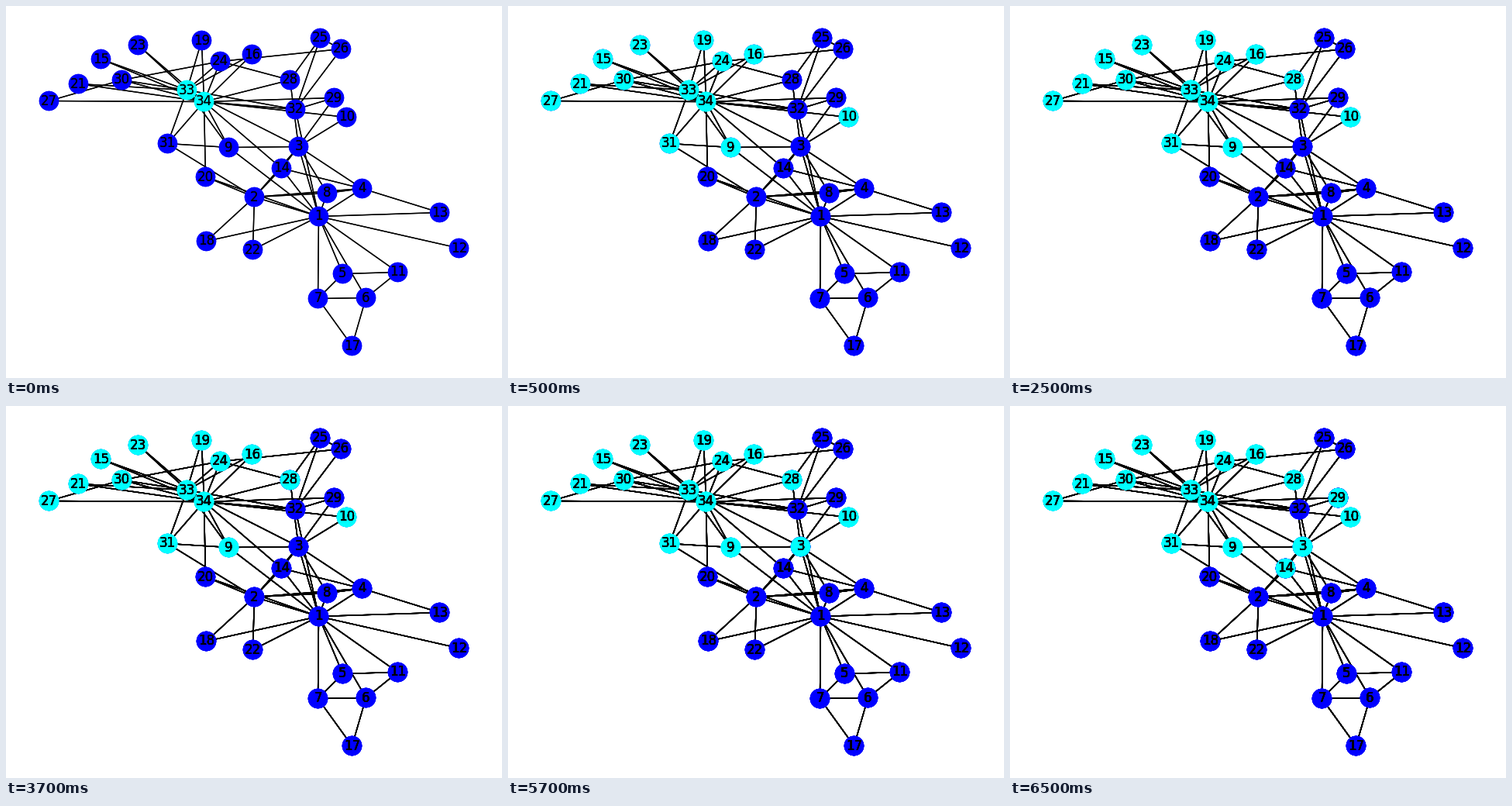
Write a matplotlib script that moves like this. It is 640x480 px and loops after 8 s.

```python
import matplotlib.pyplot as plt
import numpy as np
from matplotlib.animation import FuncAnimation
from matplotlib.collections import LineCollection

WIDTH, HEIGHT, DPI = 640, 480, 100
STEPS = 5
THRESHOLD = 0.4  # share of reached neighbours that wins a node over
REDRAWS = 2      # each step is painted twice over the previous ones

# Node centres in whole pixels, node 1 first, y pointing down
CENTRES = np.array([
    (403, 271), (320, 246), (377, 181), (459, 235), (434, 345), (464, 376),
    (402, 377), (414, 241), (287, 182), (439, 143), (505, 343), (584, 312),
    (559, 266), (355, 209), (122, 68), (317, 62), (446, 438), (258, 303),
    (252, 44), (257, 220), (93, 100), (318, 314), (170, 50), (276, 71),
    (405, 41), (432, 55), (55, 122), (366, 95), (423, 118), (149, 95),
    (208, 177), (373, 133), (233, 108), (255, 123),
]) + 0.5

# Two hubs share most of their followers; the rest hangs on nodes 1 to 3
SHARED = (9, 15, 16, 19, 21, 23, 24, 30, 31, 32)
LINKS = {
    34: (*SHARED, 10, 14, 20, *range(27, 30), 33),
    33: (*SHARED, 3),
    1: (*range(2, 10), *range(11, 15), 18, 20, 22, 32),
    2: (3, 4, 8, 14, 18, 20, 22, 31),
    3: (4, *range(8, 11), 14, 28, 29),
    4: (8, 13, 14),
    6: (7, 11, 17), 7: (5, 17), 11: (5,),
    24: (26, 28, 30), 32: (25, 26, 29), 25: (26, 28), 27: (30,), 9: (31,),
}
EDGES = np.array([(a, b) for a, ends in LINKS.items() for b in ends]) - 1


def spread():
    """Yield which nodes are reached at each step of the cascade."""
    count = len(CENTRES)
    linked = np.zeros((count, count))
    for a, b in EDGES:
        linked[a, b] = linked[b, a] = 1
    reached = np.zeros(count, dtype=bool)
    reached[-2:] = True
    for _ in range(STEPS):
        yield reached
        reached = reached | (linked @ reached / linked.sum(axis=1) >= THRESHOLD)


fig = plt.figure(figsize=(WIDTH / DPI, HEIGHT / DPI), dpi=DPI, facecolor="white")
ax = fig.add_axes([0, 0, 1, 1])
ax.set_xlim(0, WIDTH)
ax.set_ylim(HEIGHT, 0)
ax.axis("off")


def draw_graph(reached):
    """Draw the whole graph in one state and return its artists."""
    edges = LineCollection(CENTRES[EDGES], colors="black", linewidths=1, zorder=1)
    ax.add_collection(edges)
    nodes = ax.scatter(*CENTRES.T, s=300, zorder=2,
                       c=np.where(reached, "cyan", "blue"))
    labels = [
        ax.text(x, y, str(number), size=12, color="black", family="DejaVu Sans",
                ha="center", va="center", zorder=3)
        for number, (x, y) in enumerate(CENTRES, start=1)
    ]
    return [edges, nodes, *labels]


# Steps pile up without clearing, so soft edges darken over time
layers = [
    [artist for _ in range(REDRAWS) for artist in draw_graph(reached)]
    for reached in spread()
]


def update(frame):
    current = (frame + 3) // 4
    for step, artists in enumerate(layers):
        for artist in artists:
            artist.set_visible(step <= current)
    return []


anim = FuncAnimation(fig, update, frames=16, interval=500, repeat=True,
                     repeat_delay=0, blit=False)
plt.show()
```
